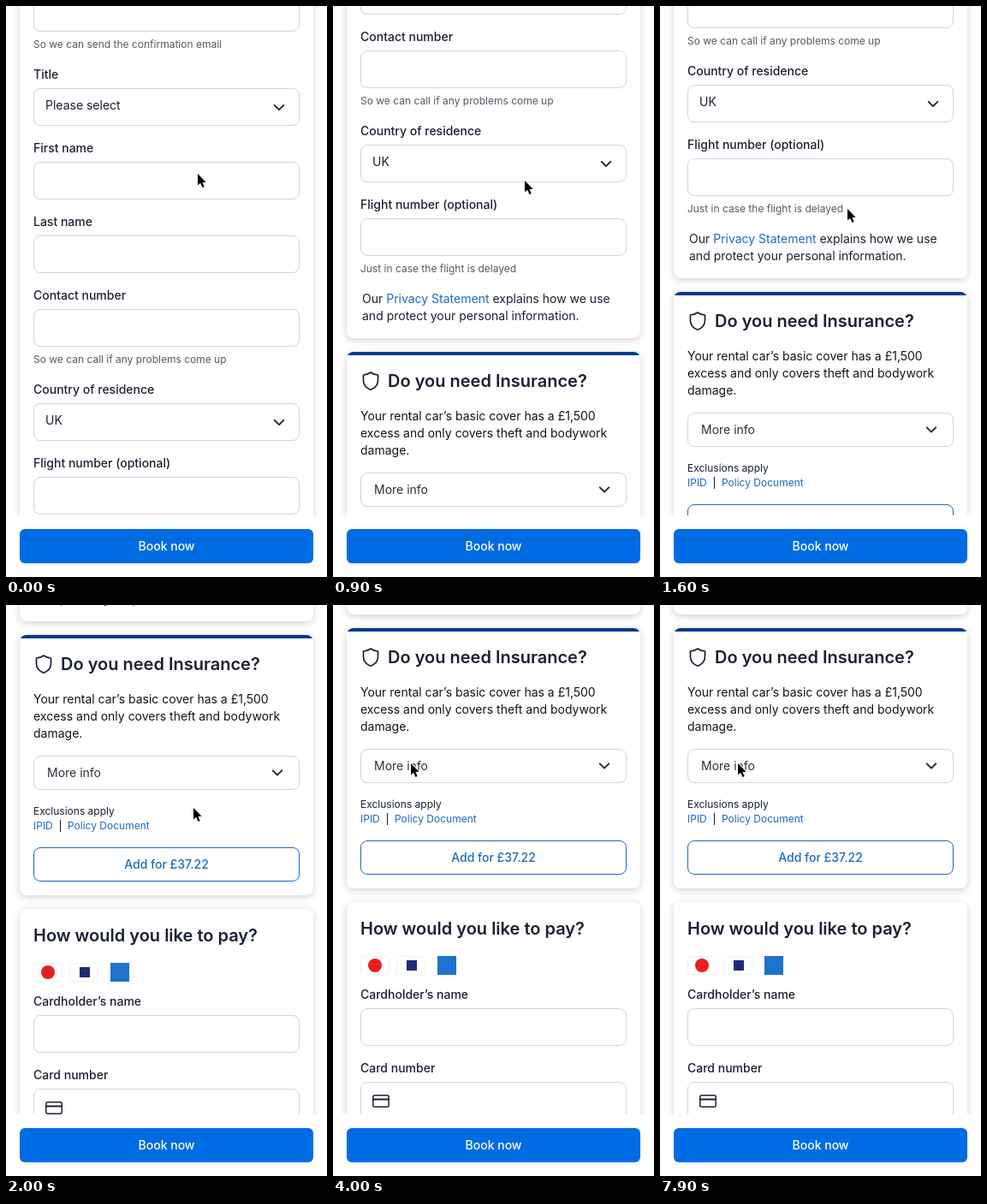
An HTML page with a canvas for the animation above (8 s loop, 375 by 667 pixels).

```html
<!DOCTYPE html>
<html lang="en">
<head>
<meta charset="utf-8">
<title>Booking form</title>
<style>
html, body { margin: 0; width: 100%; height: 100%; overflow: hidden; background: #fff; }
canvas { display: block; width: 375px; height: 667px; }
</style>
</head>
<body>
<canvas id="stage"></canvas>
<script>
const W = 375, H = 667, LOOP = 8000, STEP = 100;
const canvas = document.getElementById('stage');
const ctx = canvas.getContext('2d');
const dpr = window.devicePixelRatio || 1;
canvas.width = W * dpr;
canvas.height = H * dpr;

const INK = '#1a2032', BODY = '#2a303c', MUTED = '#535966', LINE = '#d2d5da';
const LINK = '#1a6cc0', BLUE = '#006ce4', NAVY = '#003b8f', GREEN = '#0a8015';

// Keys are [time, value, ...]; the last value is held.
const SCROLL = [[0, 0], [100, 14], [300, 116], [500, 204], [700, 263], [900, 302], [1200, 346],
  [1600, 372], [1800, 375], [1900, 540], [2000, 671], [2100, 676], [2300, 679]];
const POINTER = [[0, 224, 196], [900, 224, 204], [1600, 219, 237], [3200, 219, 237]];
const REST = [91, 185], EXPAND = 198;

const clamp = v => Math.max(0, Math.min(1, v));
const smooth = v => { v = clamp(v); return v * v * (3 - 2 * v); };
const mix = (a, b, p) => a + (b - a) * p;

function track(keys, t, i = 1) {
  for (let k = 1; k < keys.length; k++) {
    const a = keys[k - 1], b = keys[k];
    if (t < b[0]) return mix(a[i], b[i], (t - a[0]) / (b[0] - a[0]));
  }
  return keys[keys.length - 1][i];
}

function text(str, x, cy, { size = 14, weight = 400, color = INK, align = 'left' } = {}) {
  ctx.font = `${weight} ${size}px Inter, sans-serif`;
  ctx.textAlign = align;
  ctx.fillStyle = color;
  ctx.fillText(str, x, cy + size * 0.364);
  return ctx.measureText(str).width;
}

function rounded(x, y, w, h, r) {
  ctx.beginPath();
  ctx.roundRect(x, y, w, h, r);
}

function stroke(points, color, width, close) {
  ctx.beginPath();
  points.forEach(([x, y]) => ctx.lineTo(x, y));
  if (close) ctx.closePath();
  ctx.strokeStyle = color;
  ctx.lineWidth = width;
  ctx.lineCap = ctx.lineJoin = 'round';
  ctx.stroke();
}

function card(y, bottom) {
  ctx.save();
  ctx.shadowColor = 'rgba(26,26,26,.2)';
  ctx.shadowBlur = 8 * dpr;
  ctx.shadowOffsetY = 2 * dpr;
  ctx.fillStyle = '#fff';
  rounded(16, y, 343, bottom - y, 8);
  ctx.fill();
  ctx.restore();
}

function box(y, h, color = LINE) {
  rounded(32.5, y + 0.5, 310, h - 1, 7.5);
  ctx.fillStyle = '#fff';
  ctx.fill();
  ctx.strokeStyle = color;
  ctx.lineWidth = 1;
  ctx.stroke();
}

function chevron(x, y, flip = 1) {
  stroke([[x - 5.3, y - 2.7 * flip], [x, y + 2.7 * flip], [x + 5.3, y - 2.7 * flip]], INK, 1.8);
}

function field(label, y, { value, hint } = {}) {
  text(label, 32, y, { weight: 500 });
  box(y + 16, 44);
  if (value) {
    text(value, 46, y + 36);
    chevron(319, y + 38.5);
  }
  if (hint) text(hint, 32, y + 75, { size: 12, color: MUTED });
}

function form() {
  card(-300, 690);
  field('Email address', -30, { hint: 'So we can send the confirmation email' });
  field('Title', 80, { value: 'Please select' });
  field('First name', 166);
  field('Last name', 252);
  field('Contact number', 338, { hint: 'So we can call if any problems come up' });
  field('Country of residence', 448, { value: 'UK' });
  field('Flight number (optional)', 534, { hint: 'Just in case the flight is delayed' });
  let x = 34;
  x += text('Our ', x, 644);
  x += text('Privacy Statement', x, 644, { color: LINK });
  text(' explains how we use', x, 644);
  text('and protect your personal information.', 34, 664);
}

function shield() {
  ctx.beginPath();
  ctx.moveTo(44, 51);
  ctx.quadraticCurveTo(48, 54, 52.5, 54);
  ctx.lineTo(52.5, 61);
  ctx.quadraticCurveTo(52, 68, 44, 71.3);
  ctx.quadraticCurveTo(36, 68, 35.5, 61);
  ctx.lineTo(35.5, 54);
  ctx.quadraticCurveTo(40, 54, 44, 51);
  ctx.closePath();
  ctx.strokeStyle = INK;
  ctx.lineWidth = 1.7;
  ctx.lineJoin = 'round';
  ctx.stroke();
}

function details(grow, open) {
  ctx.save();
  rounded(32, 168, 311, 40 + grow, 8);
  ctx.clip();
  ctx.globalAlpha = open;
  ctx.fillStyle = LINE;
  ctx.fillRect(32, 208, 311, 1);
  ['Protect yourself against damage or theft', 'charges. Just in case something goes', 'wrong.']
    .forEach((s, i) => text(s, 48, 234 + 20 * i, { color: BODY }));
  text('Full refund for:', 48, 302, { weight: 600 });
  ['Bodywork damage / theft of car', 'Other damage (excl. interior)', 'Breakdown / admin fees']
    .forEach((s, i) => {
      const y = 329 + 26 * i;
      stroke([[50.8, y + 0.6], [54.3, y + 4.2], [61.8, y - 4]], GREEN, 1.5);
      text(s, 72, y, { size: 12, color: BODY });
    });
  ctx.restore();
}

function insurance(open) {
  const grow = Math.round(EXPAND * open);
  card(27, 331 + grow);
  ctx.save();
  rounded(16, 27, 343, 40, 8);
  ctx.clip();
  ctx.fillStyle = NAVY;
  ctx.fillRect(16, 27, 343, 4);
  ctx.restore();
  shield();
  text('Do you need Insurance?', 64, 61, { size: 20, weight: 600 });
  ['Your rental car’s basic cover has a £1,500', 'excess and only covers theft and bodywork', 'damage.']
    .forEach((s, i) => text(s, 32, 102 + 20 * i, { color: '#10141c' }));
  box(168, 40 + grow);
  text('More info', 48, 188, { color: BODY });
  chevron(317, 188, 1 - 2 * open);
  if (open > 0) details(grow, open);

  ctx.save();
  ctx.translate(0, grow);
  text('Exclusions apply', 32, 233, { size: 12 });
  text('IPID', 32, 250, { size: 12, color: LINK });
  ctx.fillStyle = INK;
  ctx.fillRect(63, 243, 1, 14);
  text('Policy Document', 72, 250, { size: 12, color: LINK });
  box(275, 40, LINK);
  text('Add for £37.22', 187.5, 295, { weight: 500, color: LINK, align: 'center' });
  ctx.restore();
  return grow;
}

function chip(x, w) {
  rounded(x + 0.5, 410.5, w, 21, 3);
  ctx.strokeStyle = '#f0f1f3';
  ctx.lineWidth = 1;
  ctx.stroke();
}

function payment() {
  card(347, 900);
  text('How would you like to pay?', 32, 378, { size: 20, weight: 600 });
  chip(32, 33);
  ctx.fillStyle = '#e8201c';
  ctx.beginPath();
  ctx.arc(49, 421, 8, 0, 7);
  ctx.fill();
  chip(74, 33);
  ctx.fillStyle = '#1c2c78';
  ctx.fillRect(86, 415, 12, 12);
  ctx.fillStyle = '#1f72cd';
  ctx.fillRect(122, 410, 22, 22);
  field('Cardholder’s name', 455);
  field('Card number', 541);
  rounded(46.8, 572.8, 18.4, 13.4, 2);
  ctx.strokeStyle = INK;
  ctx.lineWidth = 1.5;
  ctx.stroke();
  ctx.fillStyle = INK;
  ctx.fillRect(47, 576.5, 18, 2);
}

function footer() {
  ctx.fillStyle = '#fff';
  ctx.fillRect(0, 595, W, 72);
  ctx.fillStyle = BLUE;
  rounded(16, 611, 343, 40, 6);
  ctx.fill();
  text('Book now', 187.5, 631, { weight: 500, color: '#fff', align: 'center' });
}

function pointer(x, y) {
  ctx.save();
  ctx.translate(x, y);
  const arrow = [[0, 0], [0, 13.6], [3.1, 10.8], [5.4, 16], [7.7, 15], [5.4, 10], [9.6, 9.8]];
  stroke(arrow, '#fff', 2, true);
  ctx.fillStyle = '#000';
  ctx.fill();
  ctx.restore();
}

function draw(t) {
  const scroll = Math.round(track(SCROLL, t));
  const open = t < 7900 ? smooth((t - 4900) / 600) : 0;
  const move = smooth((t - 3200) / 800);

  ctx.setTransform(dpr, 0, 0, dpr, 0, 0);
  ctx.fillStyle = '#fff';
  ctx.fillRect(0, 0, W, H);

  ctx.save();
  ctx.translate(0, -scroll);
  form();
  ctx.translate(0, 679);
  const grow = insurance(open);
  ctx.translate(0, grow);
  payment();
  ctx.restore();

  footer();
  pointer(mix(track(POINTER, t, 1), REST[0], move), mix(track(POINTER, t, 2), REST[1], move));
}

const start = performance.now();
function tick() {
  const t = (performance.now() - start) % LOOP;
  draw(Math.floor(t / STEP) * STEP);
  requestAnimationFrame(tick);
}
tick();
</script>
</body>
</html>
```
